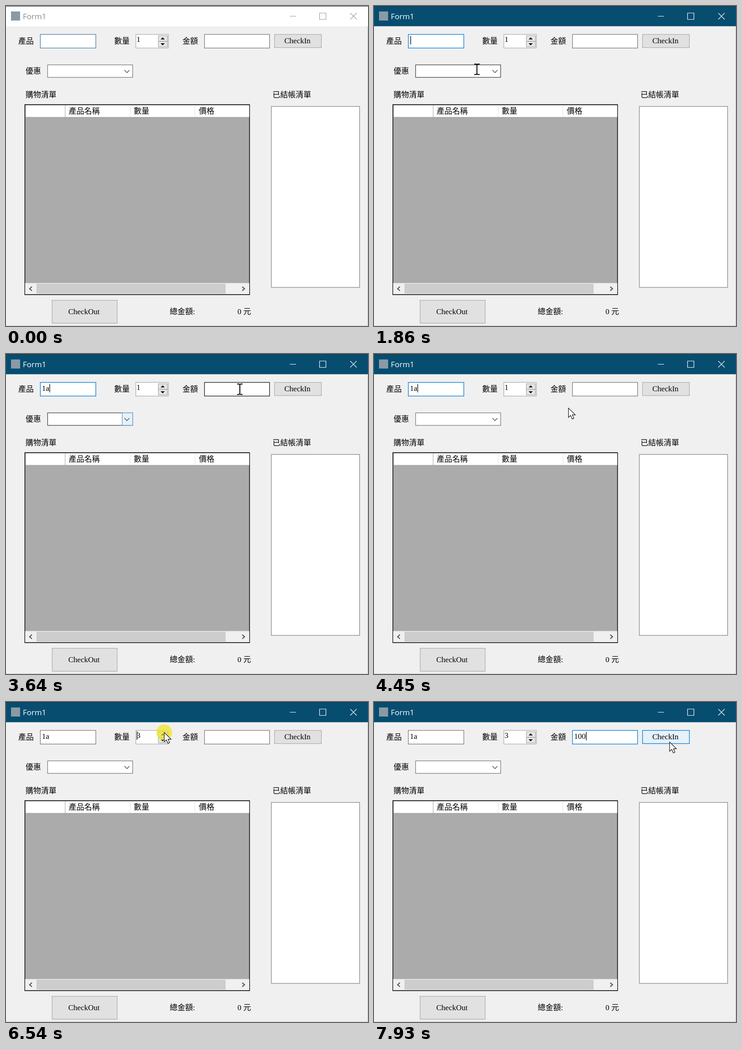
These frames come from a looping animation (796 by 704 pixels, 7990 ms). An HTML page:

```html
<!DOCTYPE html>
<html lang="zh-TW">
<head>
<meta charset="utf-8">
<title>Form1</title>
<style>
html, body { margin: 0; width: 100%; height: 100%; overflow: hidden; background: #f0f0f0; }
svg { display: block; }
text { font: 17px "Liberation Serif", "Noto Sans CJK TC", "Noto Sans CJK", serif; white-space: pre; }
#title { font: 17px "Open Sans", "Noto Sans", sans-serif; }
</style>
</head>
<body>
<svg id="stage" width="796" height="704" viewBox="0 0 796 704"></svg>
<script>
const LOOP = 7990, TICK = 66.1;
const BLUE = '#0078d7', GREY = '#7a7a7a', DARK = '#171717', HOT = '#e5f1fb';
const stage = document.getElementById('stage');

function el(tag, attrs, text) {
  const node = document.createElementNS('http://www.w3.org/2000/svg', tag);
  set(node, attrs);
  if (text) node.textContent = text;
  return stage.appendChild(node);
}
function set(node, attrs) {
  for (const key in attrs) node.setAttribute(key, attrs[key]);
}
const fill = (x, y, width, height, color) => el('rect', { x, y, width, height, fill: color });
const box = (x, y, width, height, color, stroke, weight = 1.3) =>
  el('rect', { x: x + .5, y: y + .5, width, height, fill: color, stroke, 'stroke-width': weight });
const label = (x, y, text) => el('text', { x, y }, text);
const line = (d, stroke, weight = 1.2) =>
  el('path', { d, fill: 'none', stroke, 'stroke-width': weight });
const show = (node, on) => node.setAttribute('visibility', on ? 'visible' : 'hidden');

// Window frame
fill(0, 0, 796, 704, '#f0f0f0');
const bar = fill(0, 0, 796, 44.5, '#fff');
fill(0, 0, 796, 1, '#2b2f33');
fill(795, 44, 1, 660, '#c4c4c4');
fill(0, 703, 796, 1, '#c4c4c4');
fill(11, 12, 20, 20, '#8b9aa5');
const title = el('text', { id: 'title', x: 37, y: 28.5 }, 'Form1');
const controls = line('M624 22.5H638M689.5 15.5H703.5V29.5H689.5ZM757 15.5L771 29.5M771 15.5L757 29.5', '#999');

// Top row
label(27, 83, '產品');
const product = box(75, 62, 122, 30, '#fff', GREY);
label(238, 83, '數量');
box(285, 62, 71.5, 30, '#fff', '#abadb3');
const up = box(334.5, 65, 20, 12, '#e6e6e6', '#adadad');
const down = box(334.5, 77.5, 20, 12, '#e6e6e6', '#adadad');
el('path', { d: 'M340 73.5H349L344.5 69ZM340 82H349L344.5 86.5Z' });
label(388, 83, '金額');
const price = box(436, 62, 143, 30, '#fff', GREY);
const checkIn = box(590, 62, 103, 29, '#e1e1e1', '#adadad');
label(612, 82, 'CheckIn');
const productText = label(79, 80.5, '');
const countText = label(287, 79, '1');
const priceText = label(440, 80.5, '');

// Discount
label(43, 149, '優惠');
const combo = box(91, 129, 187, 27.5, '#fff', GREY);
const comboButton = box(255, 129, 23, 27.5, HOT, '#6f9cc0');
line('M260.5 141L266 146.5L271.5 141', '#606060', 1.6);

// Cart grid
label(43, 201, '購物清單');
box(41, 216.5, 494, 418, '#ababab', '#000', 1.5);
fill(43, 218.5, 492, 26, '#fff');
fill(42, 244.5, 493, 1, '#a0a0a0');
fill(42.5, 218, 1, 27, '#a0a0a0');
fill(129.5, 218, 1, 27, '#a0a0a0');
fill(272.5, 219, 1, 25, '#e0e0e0');
fill(415, 219, 1, 25, '#e0e0e0');
label(138, 237, '產品名稱');
label(281, 237, '數量');
label(424, 237, '價格');
fill(42, 609.5, 493, 24.5, '#f0f0f0');
fill(67, 611, 416, 22, '#cdcdcd');
line('M57 617.5L52 622L57 626.5M519.5 617.5L524.5 622L519.5 626.5', '#505050', 2.2);

// Paid list and footer
label(586, 201, '已結帳清單');
box(583, 220.5, 194, 398, '#fff', '#828790');
box(101, 647, 143, 50.5, '#e1e1e1', '#adadad');
label(137, 678, 'CheckOut');
label(360, 678, '總金額:');
label(509, 678, '0 元');

// Overlays
const caret = fill(0, 66, 1.3, 18.5, '#000');
const ring = el('circle', { r: 17.5, fill: '#f6e51c', opacity: .7 });
const arrow = el('path', {
  d: 'M0 0V20.5L4.7 16.2L8.2 24L11.8 22.4L8.4 14.9H15Z',
  fill: '#fff', stroke: '#000', 'stroke-width': 1.1
});
const beam = line('M-6 -11.5H-2L0 -10.5L2 -11.5H6M0 -10.5V10.5M-6 11.5H-2L0 10.5L2 11.5H6', '#000', 2);

// Pointer path: time, x, y
const path = [
  [66, 702, 694], [330, 560, 520], [600, 300, 240], [730, 204, 143], [860, 140, 84],
  [1060, 125, 79], [1590, 125, 79], [1720, 160, 100], [1860, 231, 142], [1990, 237, 171],
  [2520, 237, 171], [2910, 237, 147], [3050, 245, 146], [3250, 265, 144], [3450, 400, 100],
  [3640, 517, 77], [3900, 517, 77], [4160, 491, 80], [4400, 425, 124], [4640, 447, 82],
  [4780, 430, 80], [5100, 360, 82], [5280, 347, 85], [5680, 347, 85], [5950, 348, 67],
  [6680, 348, 67], [7010, 535, 77], [7460, 535, 77], [7840, 650, 85], [7930, 650, 88]
];
const clicks = [1510, 5415, 6140, 6535, 7070];
const FOCUS = 1510, COUNT = 5415, PRICE = 7070;

// Typed characters: time, text so far
const typing = {
  product: [[0, ''], [2700, '1'], [3230, '1a']],
  count: [[0, '1'], [6140, '2'], [6535, '3']],
  price: [[0, ''], [7395, '1'], [7525, '10'], [7660, '100']]
};
const typed = (steps, t) => steps.filter(s => s[0] <= t).pop()[1];

function pointerAt(t) {
  const i = path.findIndex(p => p[0] > t);
  if (i < 0) return path[path.length - 1].slice(1);
  if (i === 0) return [-99, -99];
  const [t0, x0, y0] = path[i - 1], [t1, x1, y1] = path[i];
  const k = (t - t0) / (t1 - t0);
  return [x0 + (x1 - x0) * k, y0 + (y1 - y0) * k];
}

function caretAt(t) {
  const blink = start => Math.floor((t - start) / 530) % 2 === 0;
  if (t < FOCUS) return null;
  if (t < 2180) return 80;
  if (t < 2700) return null;
  if (t < 3230) return 88;
  if (t < COUNT) return blink(3230) ? 95.5 : null;
  if (t < PRICE) return blink(COUNT) ? 287.5 : null;
  const last = typing.price.filter(s => s[0] <= t).pop();
  return blink(Math.max(PRICE, last[0])) ? 440.5 + 8.5 * last[1].length : null;
}

function draw(time) {
  const t = Math.floor(time / TICK + .08) * TICK;
  const [x, y] = pointerAt(t);
  const over = (x0, y0, x1, y1) => x >= x0 && x <= x1 && y >= y0 && y <= y1;
  const active = t >= FOCUS;
  const onProduct = over(75, 62, 198, 93);
  const onPrice = over(436, 62, 580, 93);
  const onCombo = over(91, 129, 279, 157);
  const comboHot = t >= 3180 && t < 3830;

  set(bar, { fill: active ? '#064d70' : '#fff' });
  set(title, { fill: active ? '#fff' : '#888' });
  set(controls, { stroke: active ? '#fff' : '#999' });

  const productFocus = active && t < COUNT;
  const idle = active ? GREY : '#4a7ea8';
  set(product, { stroke: productFocus ? BLUE : onProduct ? DARK : idle });
  set(price, { stroke: t >= PRICE ? BLUE : onPrice ? DARK : GREY });
  set(combo, { stroke: onCombo || comboHot ? '#444' : GREY });
  show(comboButton, comboHot);

  const spin = (node, hot) => set(node, { fill: hot ? HOT : '#e6e6e6', stroke: hot ? '#62a5dc' : '#adadad' });
  spin(up, over(334, 64, 357, 77));
  spin(down, over(334, 77.1, 357, 91));
  const inHot = over(590, 62, 694, 92);
  set(checkIn, { fill: inHot ? HOT : '#e1e1e1', stroke: inHot ? BLUE : '#adadad' });

  productText.textContent = typed(typing.product, t);
  countText.textContent = typed(typing.count, t);
  priceText.textContent = typed(typing.price, t);

  const cx = caretAt(t);
  show(caret, cx !== null);
  if (cx !== null) set(caret, { x: cx, y: t >= COUNT && t < PRICE ? 64.5 : 66 });

  show(ring, clicks.some(c => t >= c && t < c + 190));
  set(ring, { cx: x, cy: y });

  const text = onProduct || onPrice || over(285, 62, 334, 93) || over(91, 129, 255, 157);
  show(arrow, !text);
  show(beam, text);
  set(text ? beam : arrow, { transform: `translate(${x} ${y})` });
}

const start = performance.now();
function frame(now) {
  draw(Math.max(0, now - start) % LOOP);
  requestAnimationFrame(frame);
}
draw(0);
requestAnimationFrame(frame);
</script>
</body>
</html>
```
